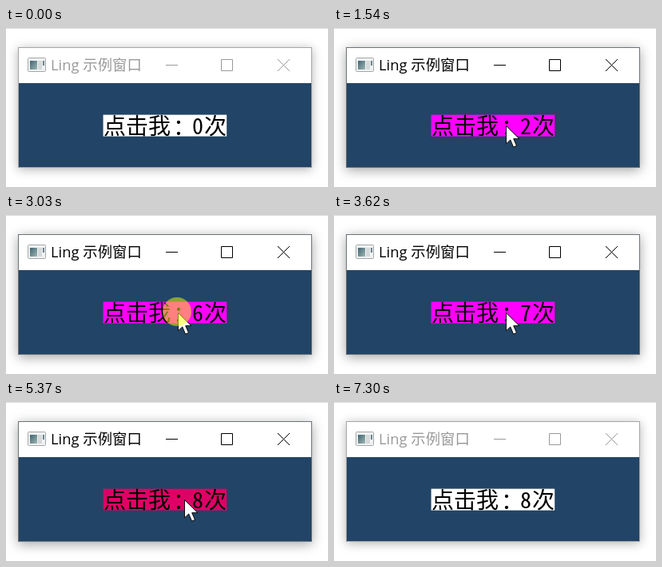
Write an HTML page that moves like this. It is 403 by 199 pixels and loops after 7430 ms.

```html
<!DOCTYPE html>
<html lang="zh-CN">
<head>
<meta charset="utf-8">
<title>示例窗口</title>
<style>
html, body { margin: 0; width: 100%; height: 100%; overflow: hidden; background: #fff; }
svg { position: absolute; inset: 0; width: 403px; height: 199px; }
#shade { position: absolute; left: 15px; top: 24px; width: 368px; height: 151px;
  box-shadow: 0 2px 12px rgba(0,0,0,.3); }
#shade.active { box-shadow: 0 3px 14px rgba(0,0,0,.36); }
#chrome { color: #999; }
#chrome.active { color: #000; }
.title { font: 18.4px "Open Sans", "Noto Sans CJK SC", "Noto Sans CJK", sans-serif; fill: currentColor; white-space: pre; }
.label { font: 28px "Noto Sans Mono CJK SC", "Noto Sans CJK SC", "Noto Sans CJK", sans-serif; }
.line { fill: none; stroke: currentColor; }
</style>
</head>
<body>
<div id="shade"></div>
<svg viewBox="0 0 403 199">
  <defs>
    <linearGradient id="pane" x2="1" y2="1">
      <stop offset="0" stop-color="#3f6672"/><stop offset="1" stop-color="#9db5b2"/>
    </linearGradient>
  </defs>
  <path d="M0 .5H403" stroke="#dcdcdc"/>
  <rect x="15" y="24" width="368" height="151" fill="#fff"/>
  <rect x="16" y="69" width="366" height="105" fill="#224466"/>
  <rect id="edge" x="15.5" y="24.5" width="367" height="150" fill="none"/>

  <rect x="27.5" y="37.5" width="22" height="17" rx="1" fill="#f1f2f2" stroke="#a3a7a9"/>
  <rect x="30" y="41" width="9" height="11" fill="url(#pane)"/>
  <rect x="40" y="41" width="5" height="11" fill="#d5d9da"/>
  <rect x="46" y="41" width="2" height="6" fill="#6b8490"/>

  <g id="chrome">
    <text class="title" x="56" y="52.5">Ling 示例窗口</text>
    <path class="line" d="M200 46.5H215M269.5 39.5H283.5V53.5H269.5Z"/>
    <path class="line" d="M340 39L355 54M355 39L340 54"/>
  </g>

  <rect id="back" x="121.6" y="108.6" width="154.6" height="27"/>
  <g class="label">
    <text x="122" y="132.5">点击我</text>
    <text x="209" y="134">：</text>
    <text id="count" x="240" y="132.5" text-anchor="middle">0</text>
    <text x="248" y="132.5">次</text>
  </g>
  <path id="arrow" d="M.5 .5V22L5.5 17.3L9.2 26L13 24.4L9.3 16H16.3Z" fill="#fff" stroke="#000" stroke-width=".9" stroke-linejoin="round"/>
  <circle id="ring" cx="214" cy="121" r="18" fill="#ff0" fill-opacity=".5"/>
</svg>
<script>
const LOOP = 7430, FOCUS = 940, BLUR = 7300, STEP = 68, HOLD = 130;
const clicks = [FOCUS, 1410, 1810, 2150, 2560, 3030, 3490, 4020];

const linear = p => p, brake = p => 1 - (1 - p) ** 6, launch = p => p ** 3;
const away = { x: 405, y: 235 };

// Each stroke runs from the previous resting point to its own.
const strokes = [
  { from: 130, to: 610, x: 215, y: 122, ease: brake },
  { from: 4560, to: 4900, x: 235, y: 150, ease: linear },
  { from: 5100, to: 5370, x: 223, y: 122, ease: linear },
  { from: 5570, to: 5760, x: 232, y: 148, ease: linear },
  { from: 6030, to: 6170, x: 231, y: 128, ease: linear },
  { from: 6500, to: 6760, ...away, ease: launch }
];

function pointer(t) {
  let pos = away;
  for (const s of strokes) {
    if (t < s.from) break;
    const gaps = Math.round((s.to - s.from) / STEP);
    const step = Math.floor((t - s.from) / (s.to - s.from) * gaps + 1e-6) + 1;
    const p = s.ease(Math.min(1, step / (gaps + 1)));
    pos = { x: pos.x + (s.x - pos.x) * p, y: pos.y + (s.y - pos.y) * p };
  }
  return pos;
}

const [shade, chrome, edge, back, count, ring, arrow] =
  ["shade", "chrome", "edge", "back", "count", "ring", "arrow"].map(id => document.getElementById(id));

function draw(t) {
  const active = t >= FOCUS && t < BLUR;
  shade.classList.toggle("active", active);
  chrome.classList.toggle("active", active);
  edge.setAttribute("stroke", active ? "#6d7378" : "#a6a6a6");

  const { x, y } = pointer(t);
  const over = x > 121 && x < 277 && y > 108 && y < 136;
  const pressed = t >= FOCUS && t < strokes[1].to;
  back.setAttribute("fill", !over ? "#fff" : pressed ? "#ff00ff" : "#df0066");
  arrow.setAttribute("transform", `translate(${Math.round(x)} ${Math.round(y)}) scale(1.04)`);

  count.textContent = clicks.filter(c => c <= t).length;
  const down = clicks.some(c => t >= c && t < c + HOLD);
  ring.setAttribute("visibility", down ? "visible" : "hidden");
}

function tick() {
  draw(performance.now() % LOOP);
  requestAnimationFrame(tick);
}
tick();
</script>
</body>
</html>
```
